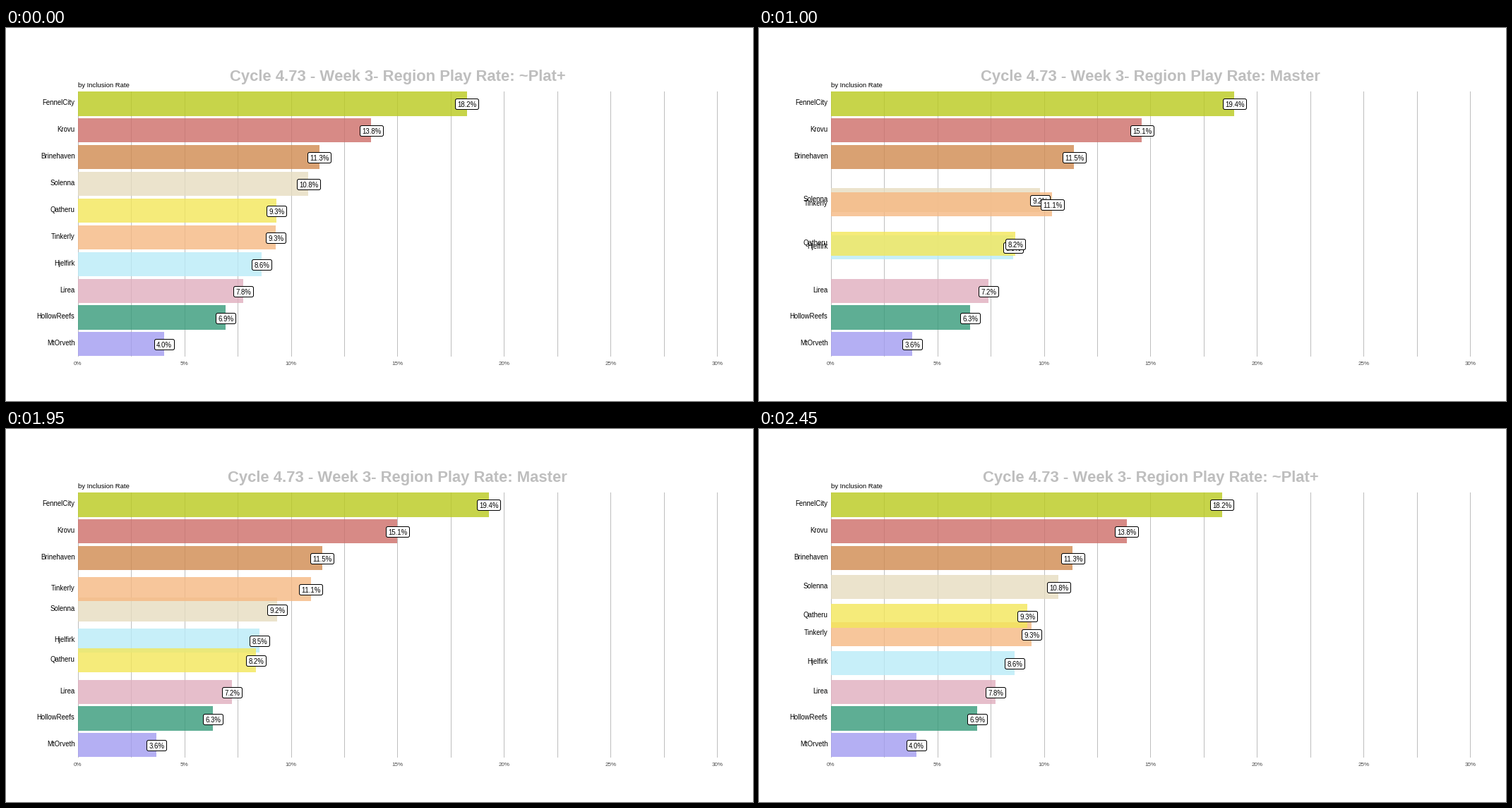
These frames come from a looping animation (1058x529 px, 2500 ms). A matplotlib script:

```python
import math

import matplotlib.pyplot as plt
from matplotlib.animation import FuncAnimation
from matplotlib.patches import FancyBboxPatch, Rectangle

W, H, DPI = 1058, 529, 100
FRAMES, STEP = 50, 50
LEFT, PER_CENT = 102.25, 30.18        # x of 0 % and pixels per percent
TOP, PITCH, BAR = 107.47, 37.88, 34.1  # first bar centre, row pitch, bar height
TITLE = "Cycle 4.73 - Week 3- Region Play Rate: "
TIERS = ("~Plat+", "Master")

# name, colour, (rate, rate), (row, row); listed from back to front
REGIONS = [
    ("FennelCity", "#baca1d", (18.24, 19.355), (0, 0)),
    ("Brinehaven", "#d08a4f", (11.32, 11.46), (2, 2)),
    ("Solenna", "#e6ddc0", (10.80, 9.20), (3, 4)),
    ("Hjelfirk", "#b9ebf8", (8.60, 8.50), (6, 5)),
    ("Lirea", "#e0aebe", (7.76, 7.16), (7, 7)),
    ("MtOrveth", "#a29bf0", (4.03, 3.64), (9, 9)),
    ("Krovu", "#cd6d68", (13.755, 15.09), (1, 1)),
    ("Tinkerly", "#f6b882", (9.26, 11.06), (5, 3)),
    ("HollowReefs", "#369a7a", (6.91, 6.26), (8, 8)),
    ("Qatheru", "#f3e759", (9.29, 8.24), (4, 6)),
]

plt.rcParams["font.family"] = "Liberation Sans"
plt.rcParams["text.kerning_factor"] = 6  # even spacing, no pair kerning
fig = plt.figure(figsize=(W / DPI, H / DPI), dpi=DPI, facecolor="white")
ax = fig.add_axes([0, 0, 1, 1])
ax.set_xlim(0, W)
ax.set_ylim(H, 0)
ax.axis("off")


def px(size):
    return size * 72 / DPI


def write(x, y, text, size, ha="center", color="black", **kw):
    return ax.text(x, y, text, fontsize=px(size), ha=ha, va="baseline",
                   color=color, **kw)


def mix(pair, p):
    return pair[0] + (pair[1] - pair[0]) * p


def progress(i):
    """Share of the way from the first state to the second."""
    if i <= 12:
        return 0.0
    if i <= 25:
        return (i - 12) / 13
    if i <= 38:
        return 1.0
    return 1 - (i - 38) / 12


class Row:
    def __init__(self, order, name, color, rates, rows):
        self.rates, self.rows = rates, rows
        self.bar = Rectangle((LEFT, 0), 1, BAR, facecolor=color, alpha=0.8,
                             linewidth=0, snap=True, zorder=2 + order / 100)
        self.box = FancyBboxPatch((0, 0), 1, 1, facecolor="white",
                                  edgecolor="black", linewidth=px(1),
                                  boxstyle="round,pad=0,rounding_size=2.4",
                                  zorder=3 + order / 100)
        ax.add_patch(self.bar)
        ax.add_patch(self.box)
        self.value = write(0, 0, "", 9.7, zorder=3.005 + order / 100)
        self.name = write(97.5, 0, name, 9.7, ha="right", zorder=4)

    def update(self, p, state):
        y = TOP + PITCH * mix(self.rows, p)
        length = PER_CENT * mix(self.rates, p)
        self.bar.set_bounds(LEFT, y - BAR / 2, length, BAR)

        text = f"{self.rates[state]:.1f}%"
        width = 33 if len(text) == 5 else 28
        x0 = round(LEFT + length - width / 2) + 0.5
        y0 = round(y - 7) + 0.5
        self.box.set_bounds(x0, y0, width, 15)
        self.value.set_text(text)
        self.value.set_position((x0 + width / 2 - 0.3, y0 + 11.5))
        self.name.set_y(round(y + 1.9))


for k in range(13):
    x = LEFT + 2.5 * k * PER_CENT
    line_x = math.floor(x) + 0.5
    ax.plot([line_x, line_x], [90, 466], color="#bebebe", linewidth=px(1),
            solid_capstyle="butt", snap=False, zorder=1)
    if k % 2 == 0:
        write(x - 0.3, 478, f"{k * 5 // 2}%", 8, color="#4d4d4d")

title = write(554.5, 75, "", 22, color="#bebebe", weight="bold")
write(102.3, 84, "by Inclusion Rate", 9.5, ha="left")
rows = [Row(n, *region) for n, region in enumerate(REGIONS)]


def draw(i):
    p = progress(i)
    state = int(p > 0.5)
    title.set_text(TITLE + TIERS[state])
    for row in rows:
        row.update(p, state)
    return []


anim = FuncAnimation(fig, draw, frames=FRAMES, interval=STEP,
                     init_func=lambda: draw(0), repeat=True, repeat_delay=0)
plt.show()
```
